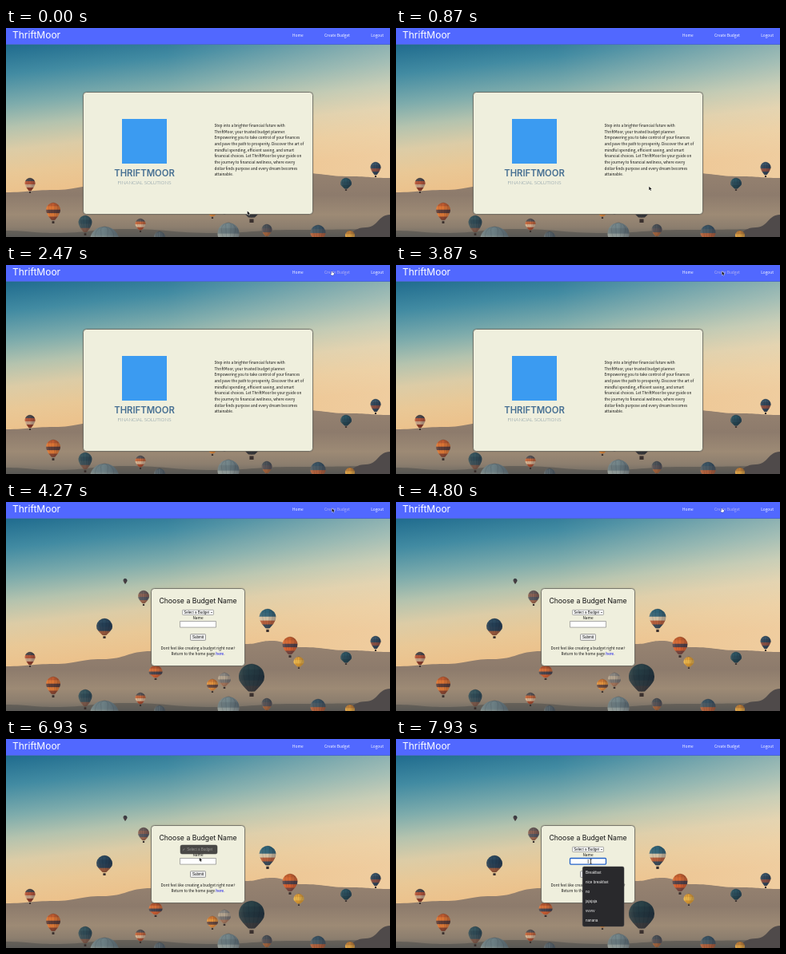
Recreate the animation shown at these times as an HTML page with a canvas. Size 480 by 262 pixels, loop 8 s.

```html
<!DOCTYPE html>
<html lang="en">
<head>
<meta charset="utf-8">
<title>Budget planner</title>
<style>
html, body { margin: 0; width: 100%; height: 100%; overflow: hidden; background: #5168ff; }
canvas { display: block; width: 480px; height: 262px; }
</style>
</head>
<body>
<canvas id="stage"></canvas>
<script>
const W = 480, H = 262, LOOP = 8000;
const BRAND = "ThriftMoor";
const BODY = '"Noto Sans CJK JP", "Noto Sans CJK SC", "Noto Sans", sans-serif';
const COPY_FONT = "500 4.75px " + BODY;
const HEAD = 'Inter, sans-serif';
const FORM = '"Liberation Sans", sans-serif';

const canvas = document.getElementById("stage");
const ratio = window.devicePixelRatio || 1;
canvas.width = W * ratio;
canvas.height = H * ratio;
let c = canvas.getContext("2d");

// Moments when the page state changes, in ms
const T = { hover: 1530, arrow: 3600, page: 3930, hand: 4470, leave: 4930,
            open: 5800, close: 7000, focus: 7300, list: 7600 };

// Pointer path: time, x, y
const PATH = [
  [0, 301.7, 229.5], [670, 301.7, 229.5], [1530, 407.5, 8], [4830, 407.5, 8],
  [5130, 290, 95], [5270, 290, 95], [5670, 241.6, 138.8], [6130, 241.6, 138.8],
  [6600, 241.8, 148.8], [7000, 241.8, 148.8], [7250, 243.5, 153.5], [LOOP, 243.5, 153.5]
];

const COPY = [
  "Step into a brighter financial future with",
  BRAND + ", your trusted budget planner.",
  "Empowering you to take control of your finances",
  "and pave the path to prosperity. Discover the art of",
  "mindful spending, efficient saving, and smart",
  "financial choices. Let " + BRAND + " be your guide on",
  "the journey to financial wellness, where every",
  "dollar finds purpose and every dream becomes",
  "attainable."
];

const HINTS = ["Breakfast", "nice breakfast", "no", "jajajaja", "vvvvv", "nanana"];

// Balloons: centre x, top, width, total height, band colours from the top down
const BALLOONS = [
  [149, 96, 5, 7, "#45454a #55484a"],
  [172, 111, 14, 19, "#6d5d5a #8a6254 #5a5a62 #a06a50"],
  [123, 146, 20, 25, "#2c4a60 #243f55 #2a4054 #9a5a3c"],
  [327, 134, 21, 29, "#2f6478 #39687a #d8c6a8 #b9603c #3c4c5a"],
  [355, 169, 19, 26, "#c8602f #dc6b34 #54424a #d9602f #7a4840"],
  [366, 194, 13, 15, "#e2a23a #eeb84a #dc9b32"],
  [425, 188, 14, 16, "#2c5563 #2a4c5a #24444f"],
  [462, 168, 13, 19, "#3a5468 #32485c #8a5044 #354558"],
  [30, 188, 13, 19, "#4d4a4e #b9573a #c9a488 #8e3d2a"],
  [187, 205, 17, 18, "#b5552f #d8703a #4a4650 #d06032"],
  [59, 219, 18, 26, "#c05c30 #e07634 #5d3d38 #e07a36 #8b4630"],
  [99, 235, 17, 25, "#37565f #2f4b56 #3c525a #7d5a4a"],
  [168, 239, 13, 17, "#5a5658 #c8683c #d8b492 #a94d2f"],
  [258, 222, 14, 17, "#d07a36 #e8963e #6a4a40 #e08a3c"],
  [273, 214, 16, 20, "#8d8a84 #b8a892 #7d7874 #a8785c"],
  [307, 203, 32, 41, "#2a4248 #243a42 #22353e #2c3a40 #3a3a3c"],
  [278, 244, 27, 33, "#74868a #68797e #8f9a98 #5d7079"],
  [326, 246, 13, 18, "#4c5258 #5a5558 #a5653d"],
  [390, 247, 19, 24, "#3a5464 #4a5a64 #b0603c #365f7b"],
  [123, 249, 36, 40, "#6c7f84 #7c8a8a #69777a"],
  [192, 255, 14, 20, "#59656b #505c64"],
  [430, 254, 12, 16, "#c08038 #dfa344 #c98738"]
];

function fade(x0, y0, x1, y1, ...stops) {
  const g = c.createLinearGradient(x0, y0, x1, y1);
  stops.forEach(([at, color]) => g.addColorStop(at, color));
  return g;
}

function box(x, y, w, h, r, fill, stroke, line = 1) {
  c.beginPath();
  c.roundRect(x, y, w, h, r);
  if (fill) { c.fillStyle = fill; c.fill(); }
  if (stroke) { c.strokeStyle = stroke; c.lineWidth = line; c.stroke(); }
}

function text(str, x, y, font, color = "#111", align = "left") {
  c.font = font;
  c.fillStyle = color;
  c.textAlign = align;
  c.fillText(str, x, y);
}

// Smooth hill line through a few points, filled down to the bottom edge
function hill(points, fill) {
  c.beginPath();
  c.moveTo(points[0][0], H);
  c.lineTo(...points[0]);
  for (let i = 1; i < points.length; i++) {
    const [ax, ay] = points[i - 1], [bx, by] = points[i];
    const mx = (ax + bx) / 2;
    c.bezierCurveTo(mx, ay, mx, by, bx, by);
  }
  c.lineTo(W, H);
  c.fillStyle = fill;
  c.fill();
}

function envelope(x, top, rx, h) {
  const ry = Math.min(Math.abs(rx), h / 2), neck = rx * 0.25;
  c.beginPath();
  c.ellipse(x, top + ry, rx, ry, 0, Math.PI * 0.9, Math.PI * 0.1);
  c.quadraticCurveTo(x + rx * 0.75, top + h * 0.78, x + neck, top + h);
  c.lineTo(x - neck, top + h);
  c.quadraticCurveTo(x - rx * 0.75, top + h * 0.78, x - rx * 0.95, top + ry * 1.31);
}

function balloon([x, top, w, h, colors]) {
  const bands = colors.split(" "), body = h * 0.84, n = bands.length;
  const stops = bands.flatMap((color, i) => [[(i + 0.12) / n, color], [(i + 0.88) / n, color]]);
  envelope(x, top, w / 2, body);
  c.fillStyle = fade(0, top, 0, top + body, ...stops);
  c.fill();
  c.fillStyle = fade(x - w / 2, 0, x + w / 2, 0,
    [0, "rgba(255,225,180,.12)"], [0.45, "rgba(20,20,35,0)"], [1, "rgba(20,20,35,.3)"]);
  c.fill();
  c.strokeStyle = "rgba(25,25,35,.22)";
  c.lineWidth = 0.5;
  for (const k of [0.25, 0.65]) {
    envelope(x, top, w / 2 * k, body);
    c.stroke();
  }
  c.fillStyle = "#3a302e";
  c.fillRect(x - w * 0.08, top + h * 0.89, w * 0.16, h * 0.11);
}

function landscape() {
  // The light falls off toward the upper left, so the sky gradient is tilted
  c.fillStyle = fade(0, 20, 21, 208, [0, "#1f6b8e"], [0.2, "#428ba2"], [0.4, "#7eacac"],
    [0.55, "#b4c3ae"], [0.7, "#dccca6"], [0.85, "#e9c896"], [1, "#ecc18b"]);
  c.fillRect(0, 20, W, H);
  c.fillStyle = fade(200, 0, W, 0, [0, "rgba(246,230,202,0)"], [1, "rgba(246,230,202,.32)"]);
  c.fillRect(0, 20, W, H);
  hill([[0, 206], [60, 203], [120, 197], [182, 187], [240, 186], [300, 178], [332, 174],
    [370, 182], [430, 186], [W, 188]],
    fade(0, 174, 0, 262, [0, "#978371"], [0.4, "#8d7b6c"], [0.68, "#9d8a75"],
      [0.86, "#8c7e6e"], [1, "#6d6962"]));
  hill([[0, 254], [60, 257], [150, 252], [260, 257], [360, 253], [W, 252]],
    "rgba(66,67,68,.45)");
  hill([[415, 262], [450, 250], [W, 234]], "#4f4a4a");
  BALLOONS.forEach(balloon);
}

function panel(x, y, w, h) {
  c.save();
  c.shadowColor = "rgba(0,0,0,.3)";
  c.shadowBlur = 2 * ratio;
  box(x, y, w, h, 4, "#efefdd");
  c.restore();
  box(x, y, w, h, 4, null, "#55544e", 0.7);
}

function navbar(hovered) {
  c.fillStyle = "#5168ff";
  c.fillRect(0, 0, W, 20);
  c.fillStyle = "#4a69cc";
  c.fillRect(0, 20, W, 1);
  text(BRAND, 8, 13, "400 12px " + HEAD, "#fff");
  const font = "500 4.85px " + BODY;
  text("Home", 358, 11, font, "#fff");
  text("Create Budget", 398, 11, font, hovered ? "#b9b5ee" : "#fff");
  text("Logout", 472, 11, font, "#fff", "right");
}

function welcome() {
  panel(96.5, 80.5, 287, 153);
  box(145, 114, 56, 56, 0, "#3b9bf1");
  text(BRAND.toUpperCase(), 173, 186.3, "600 11.3px " + HEAD, "#466f92", "center");
  text("FINANCIAL SOLUTIONS", 173, 196, "300 6.2px Lato, sans-serif", "#6f8797", "center");
  COPY.forEach((line, i) => text(line, 260.5, 124 + i * 7.67, COPY_FONT));
}

function chevron(x, y) {
  c.beginPath();
  c.moveTo(x - 1.1, y - 0.6);
  c.lineTo(x, y + 0.6);
  c.lineTo(x + 1.1, y - 0.6);
  c.strokeStyle = "#222";
  c.lineWidth = 0.6;
  c.stroke();
}

function budgetForm(t) {
  const focused = t >= T.focus;
  panel(181.5, 108.5, 117, 97);
  text("Choose a Budget Name", 240, 127, "400 8.7px " + HEAD, "#111", "center");
  box(220.5, 135.3, 39, 6.2, 0.8, "#fff", "#767676", 0.6);
  text("Select a Budget", 222.3, 140, "4.5px " + FORM);
  chevron(257, 138.5);
  text("Name", 240, 147, COPY_FONT, "#111", "center");
  if (focused) box(217.5, 149.5, 45, 7.6, 1, "#fff", "#2463c9", 1.3);
  else box(217.5, 149.5, 45, 7.6, 0, "#fff", "#888", 0.7);
  if (focused) {
    c.fillStyle = "#222";
    c.fillRect(239.8, 151, 0.6, 5);
  }
  box(230.5, 165.7, 19, 7.7, 0.8, "#efefef", "#777", 0.7);
  text("Submit", 240, 171.2, "4.5px " + FORM, "#111", "center");
  text("Dont feel like creating a budget right now?", 240, 184.8, COPY_FONT, "#111", "center");

  const lead = "Return to the home page ", link = "here";
  c.font = COPY_FONT;
  const a = c.measureText(lead).width, b = c.measureText(link).width;
  const x = 240 - (a + b + c.measureText(".").width) / 2;
  text(lead, x, 192.3, COPY_FONT);
  text(link, x + a, 192.3, COPY_FONT, "#0000ee");
  text(".", x + a + b, 192.3, COPY_FONT);

  if (t >= T.open && t < T.close) {
    box(218, 133, 46, 11, 2, "#4a4947", "#353432", 0.5);
    text("✓", 220.5, 140.3, '4.5px "DejaVu Sans", sans-serif', "#aaa9a5");
    text("Select a Budget", 226.3, 140.2, "4.5px " + FORM, "#969590");
  }
  if (t >= T.list) {
    box(233.2, 160, 51.8, 75, 2, "#29292c", "#47474b", 0.5);
    HINTS.forEach((hint, i) => text(hint, 237, 169.4 + i * 11.95, "4.6px " + FORM, "#f0f0f0"));
  }
}

function pointerAt(t) {
  const i = PATH.findIndex(p => p[0] > t);
  const [t0, x0, y0] = PATH[i - 1], [t1, x1, y1] = PATH[i];
  const k = (t - t0) / (t1 - t0), e = k * k * (3 - 2 * k);
  return [x0 + (x1 - x0) * e, y0 + (y1 - y0) * e];
}

const ARROW = new Path2D("M0 0V4.5L1.1 3.5L1.8 5.1L2.6 4.8L1.8 3.2H3.3Z");
const HAND = new Path2D("M-.4 0H.4V1.6L2.4 2.1V3.6L1.8 4.8H-.6L-1.8 2.9L-1.1 2.5L-.4 3.2Z");
const BEAM = new Path2D("M-1.2 -2.7H1.2M0 -2.7V2.7M-1.2 2.7H1.2");

function pointer(t, hovered) {
  const [x, y] = pointerAt(t);
  c.save();
  c.translate(x, y);
  if (t >= T.focus) {
    c.strokeStyle = "#222";
    c.lineWidth = 0.8;
    c.stroke(BEAM);
  } else {
    const hand = hovered && (t < T.arrow || t >= T.hand);
    const shape = hand ? HAND : ARROW;
    c.strokeStyle = hand ? "#333a70" : "#fff";
    c.lineWidth = 0.7;
    c.stroke(shape);
    c.fillStyle = hand ? "#fff" : "#111";
    c.fill(shape);
  }
  c.restore();
}

// The scenery never changes, so it is painted once
const scenery = document.createElement("canvas");
scenery.width = canvas.width;
scenery.height = canvas.height;
const main = c;
c = scenery.getContext("2d");
c.scale(ratio, ratio);
landscape();
c = main;
c.scale(ratio, ratio);

function draw(now) {
  const t = now % LOOP;
  const hovered = t >= T.hover && t < T.leave;
  c.drawImage(scenery, 0, 0, W, H);
  navbar(hovered);
  if (t < T.page) welcome();
  else budgetForm(t);
  pointer(t, hovered);
}

const start = performance.now();
function tick() {
  draw(performance.now() - start);
  requestAnimationFrame(tick);
}
tick();
</script>
</body>
</html>
```
